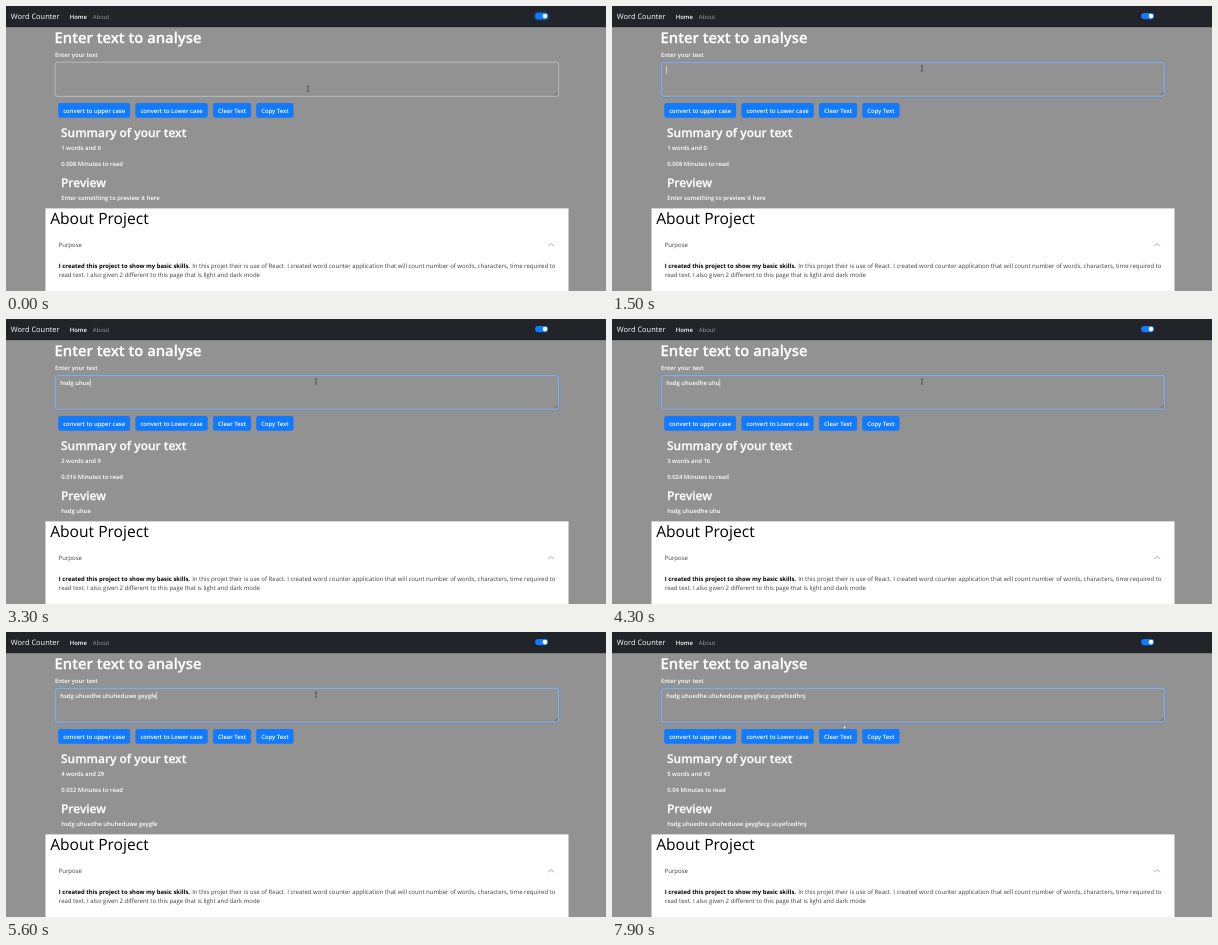
An HTML page that plays this animation: 600 px wide and 285 px high, repeating every 8 s.

```html
<!DOCTYPE html>
<html lang="en">
<head>
<meta charset="utf-8">
<title>Word Counter</title>
<style>
  html, body { margin: 0; width: 100%; height: 100%; overflow: hidden; background: #929292; }
  svg { display: block; width: 600px; height: 285px; }
  text { font: 600 5.92px "Open Sans", "Noto Sans", sans-serif; fill: #fff; text-rendering: geometricPrecision; white-space: pre; }
  .brand { font-size: 7.45px; font-weight: 500; }
  .muted { font-weight: 500; fill: #9b9d9e; }
  .h1, .h2 { stroke: #fff; stroke-width: .25px; }
  .h1 { font-size: 14.78px; }
  .h2 { font-size: 11.95px; }
  .title { font-size: 15.6px; font-weight: 500; fill: #000; }
  .dark { font-size: 6.02px; font-weight: 400; fill: #3c3f42; }
  .bold { font-size: 5.92px; font-weight: 700; fill: #000; }
  .button { fill: #127aff; }
</style>
</head>
<body>
<svg viewBox="0 0 600 285">
  <rect width="600" height="285" fill="#929292"/>

  <rect width="600" height="21.2" fill="#212529"/>
  <text class="brand" x="4.8" y="13.2">Word Counter</text>
  <text x="63.8" y="12.8">Home</text>
  <text class="muted" x="86.8" y="12.8">About</text>
  <rect id="switchGlow" x="527.9" y="5.8" width="15.4" height="8.6" rx="4.3" fill="#0d6efd"/>
  <rect class="button" x="529.1" y="7" width="13" height="6.2" rx="3.1"/>
  <circle cx="539" cy="10.1" r="2.3" fill="#fff"/>

  <text class="h1" x="48.6" y="37">Enter text to analyse</text>
  <text x="49" y="51.2">Enter your text</text>
  <rect x="49.1" y="56.2" width="503.6" height="34.2" rx="2.4" fill="none" stroke="#ced4da" stroke-width=".6"/>
  <g id="focus" fill="none">
    <rect x="48.5" y="55.6" width="504.8" height="35.4" rx="3" stroke="#0d6efd" stroke-opacity=".3"/>
    <rect x="49.1" y="56.2" width="503.6" height="34.2" rx="2.4" stroke="#78aaf0" stroke-width=".7"/>
  </g>
  <path d="M548.6 89.2l3-3M550.4 89.2l1.2-1.2" stroke="#444" stroke-width=".5"/>
  <text id="field" x="54.2" y="66.2"></text>
  <rect id="caret" y="59.8" width=".55" height="8" fill="#fff"/>

  <g id="buttons"></g>

  <text class="h2" x="55" y="131">Summary of your text</text>
  <text id="summary" x="55.2" y="143.9"></text>
  <text id="minutes" x="55.2" y="159.6"></text>
  <text class="h2" x="55" y="181">Preview</text>
  <text id="preview" x="55.2" y="193.8"></text>

  <rect x="39.5" y="202.4" width="523" height="83" fill="#fff"/>
  <text class="title" x="44.2" y="218.4">About Project</text>
  <text class="dark" x="52.6" y="241.2">Purpose</text>
  <path d="M542.3 240.2l2.8-2.8 2.8 2.8" fill="none" stroke="#7d93bd" stroke-width=".8"/>
  <text class="bold" x="52.8" y="262.2">I created this project to show my basic skills.</text>
  <text class="dark" x="186.2" y="262.2">In this projet their is use of React. I created word counter application that will count number of words, characters, time required to</text>
  <text class="dark" x="52.8" y="271.3">read text. I also given 2 different to this page that is light and dark mode</text>

  <g id="pointer">
    <path id="beam" d="M-1.2-2.6H-.3L0-2.3.3-2.6H1.2M0-2.3V2.3M-1.2 2.6H-.3L0 2.3.3 2.6H1.2" fill="none" stroke="#2a2a2a" stroke-width=".55"/>
    <path id="arrow" d="M0-2.2L2.4.6H1L1.6 2 .8 2.3.2.9-.8 1.6z" fill="#fff" stroke="#333" stroke-width=".3"/>
  </g>
</svg>
<script>
const LOOP = 8000, TICK = 100, FOCUS = 500, BLINK = 500;

// Bursts of typing: characters are spread evenly from start to end.
const BURSTS = [
  ['hsdg', 1900, 2300], [' ', 2700, 2700], ['uhuedhe', 3000, 3500], [' ', 3700, 3700],
  ['uhu', 4200, 4300], ['heduwe ', 4500, 5000], ['geygfe', 5200, 5600],
  ['cg u', 5700, 6300], ['uy', 6500, 6500], ['efcedhnj', 6700, 7100],
];
const KEYS = BURSTS.flatMap(([text, start, end]) =>
  [...text].map((char, i) => ({ char, time: start + (end - start) * i / (text.length - 1 || 1) })));

const $ = id => document.getElementById(id);
const show = (id, opacity) => $(id).setAttribute('opacity', opacity);
const progress = (t, start, end) => Math.min(1, Math.max(0, (t - start) / (end - start)));

function addButton(label, x) {
  const group = document.createElementNS('http://www.w3.org/2000/svg', 'g');
  $('buttons').append(group);
  group.innerHTML = `<rect class="button" x="${x}" y="97" height="14.8" rx="2.2"/>
    <text x="${x + 5}" y="106.6">${label}</text>`;
  const width = group.querySelector('text').getComputedTextLength() + 10;
  group.querySelector('rect').setAttribute('width', width);
}
addButton('convert to upper case', 52.2);
addButton('convert to Lower case', 129.4);
addButton('Clear Text', 207);
addButton('Copy Text', 250.2);

function render(time) {
  const t = Math.floor(time / TICK) * TICK;
  const typed = KEYS.filter(key => key.time <= t);
  const text = typed.map(key => key.char).join('');
  const words = text.split(' ').length;

  $('field').textContent = text.replace(/ $/, '\u00a0');
  $('preview').textContent = text.trim() || 'Enter something to preview it here';
  $('summary').textContent = `${words} words and ${text.length}`;
  $('minutes').textContent = `${+(words * 0.008).toFixed(3)} Minutes to read`;

  const lastKey = typed.length ? Math.ceil(typed.at(-1).time / TICK) * TICK : FOCUS;
  const blinkOn = Math.floor((t - lastKey) / BLINK) % 2 === 0;
  $('caret').setAttribute('x', 54.2 + (text ? $('field').getComputedTextLength() : 0));
  show('caret', t >= FOCUS && blinkOn ? 1 : 0);

  const focus = progress(t, FOCUS - 50, FOCUS + 150);
  show('focus', focus);
  show('switchGlow', 0.4 * (1 - focus));

  const enter = progress(t, 0, 300), leave = progress(t, 7500, 7900);
  const x = 302 + 8 * enter - 78 * leave;
  const y = 83 - 20.5 * enter + 33 * leave;
  $('pointer').setAttribute('transform', `translate(${x} ${y})`);
  show('beam', y < 91 ? 1 : 0);
  show('arrow', y < 91 ? 0 : 1);
}

const start = performance.now();
function frame() {
  render((performance.now() - start) % LOOP);
  requestAnimationFrame(frame);
}
frame();
</script>
</body>
</html>
```
